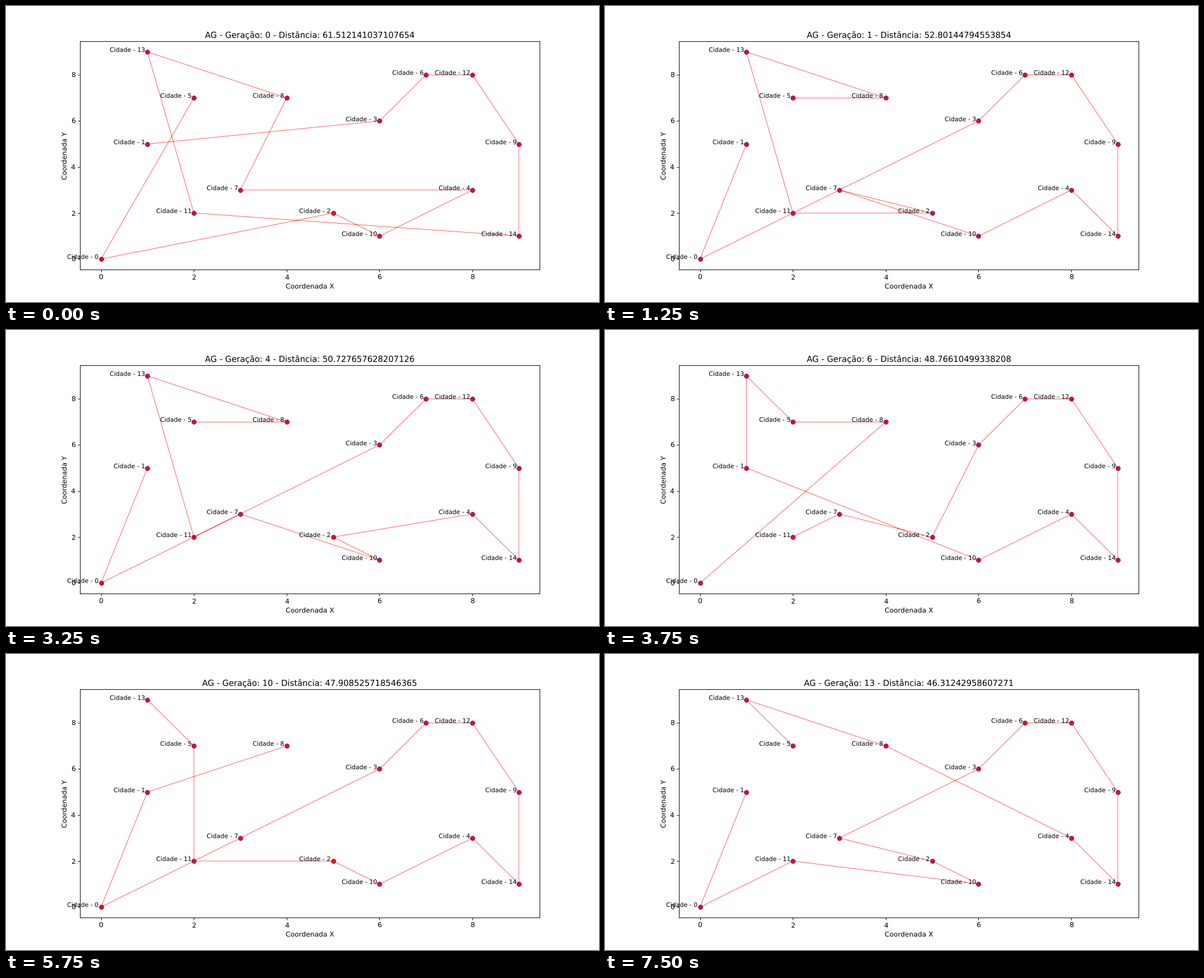
A matplotlib script that plays this animation: 1058 px wide and 529 px high, repeating every 8 s.

```python
import matplotlib.pyplot as plt
from matplotlib.animation import FuncAnimation

WIDTH_PX, WIDTH_IN, HEIGHT_IN = 1058, 12, 6
INTERVAL = 250
FRAMES = 32
HOLD = 5  # animation steps each route stays on screen

CITIES = [
    (0, 0), (1, 5), (5, 2), (6, 6), (8, 3), (2, 7), (7, 8), (3, 3),
    (4, 7), (9, 5), (6, 1), (2, 2), (8, 8), (1, 9), (9, 1),
]

# Every route runs up the east side; only its two ends evolve.
EAST = "14 9 12 6"
SOUTH_EAST = f"10 4 {EAST}"
WEST_END = "0 1"
ROUTES = {
    "0 - Distância: 61.512141037107654": f"5 0 2 10 4 7 8 13 11 {EAST} 3 1",
    "1 - Distância: 52.80144794553854": f"5 8 13 11 2 7 {SOUTH_EAST} 3 {WEST_END}",
    "4 - Distância: 50.727657628207126": f"5 8 13 11 7 10 2 4 {EAST} 3 {WEST_END}",
    "6 - Distância: 48.76610499338208": f"0 8 5 13 1 {SOUTH_EAST} 3 2 7 11",
    "10 - Distância: 47.908525718546365": f"13 5 11 2 {SOUTH_EAST} 3 7 {WEST_END} 8",
    "12 - Distância: 46.90496819655263": f"5 13 3 10 2 4 {EAST} 8 7 11 {WEST_END}",
    "13 - Distância: 46.31242958607271": f"5 13 8 4 {EAST} 3 7 2 10 11 {WEST_END}",
}
STAGES = list(ROUTES.items())

plt.rcParams.update({"font.family": "DejaVu Sans", "text.hinting": "none"})
fig, ax = plt.subplots(figsize=(WIDTH_IN, HEIGHT_IN), dpi=WIDTH_PX / WIDTH_IN)
ax.set_xlabel("Coordenada X")
ax.set_ylabel("Coordenada Y")
title = ax.set_title("")

ax.plot(*zip(*CITIES), "o", color="red", markersize=6.5,
        markeredgecolor="blue", markeredgewidth=0.5)
for number, (x, y) in enumerate(CITIES):
    ax.text(x - 0.05, y, f"Cidade - {number}", fontsize=9, ha="right")

path, = ax.plot([], [], color="red", linewidth=0.5, zorder=1.5)


def update(step):
    caption, order = STAGES[step // HOLD]
    path.set_data(*zip(*(CITIES[int(city)] for city in order.split())))
    title.set_text(f"AG - Geração: {caption}")
    return path, title


animation = FuncAnimation(fig, update, frames=FRAMES, interval=INTERVAL,
                          repeat=True, repeat_delay=0)
plt.show()
```
